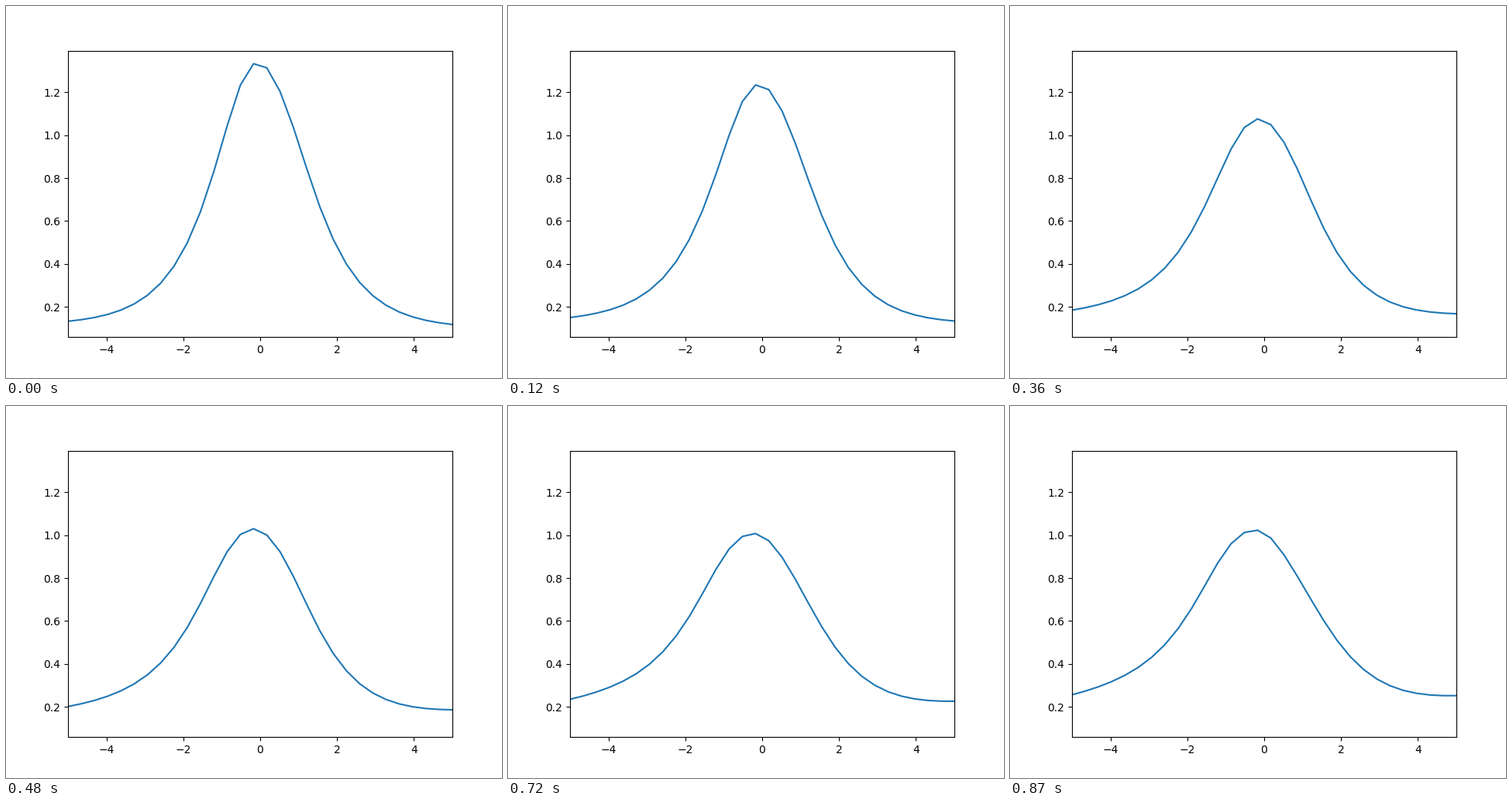
A matplotlib script that plays this animation: 640x480 px, repeating every 900 ms.

```python
import numpy as np
import matplotlib.pyplot as plt
from matplotlib.animation import FuncAnimation

FRAMES, INTERVAL = 30, 30

x = np.linspace(-5, 5, 30)
sech, tanh = 1 / np.cosh(x), np.tanh(x)

# Tall narrow pulse at the start of the loop.
start = (0.107 - 0.0085 * tanh
         + sech * (1.230 - 0.053 * tanh + 0.145 * tanh**2 + 0.123 * tanh**3))

# Lower pulse at the end, with a raised floor and a broad left shoulder.
end = (0.231 - 0.036 * np.sin(np.pi * x / 5)
       + sech * (0.780 - 0.083 * tanh + 0.177 * tanh**2
                 + (0.155 * x - 0.065) * tanh**3))

# Extra dip of the crest halfway through.
dip = sech * (0.137 + tanh**2 * (0.047 * x + 0.018 * x * tanh - 0.036))


def curve(i):
    u = i / (FRAMES - 1)
    return (1 - u) * start + u * end - np.sin(np.pi * u) * dip


fig, ax = plt.subplots(figsize=(6.4, 4.8), dpi=100)
line, = ax.plot(x, curve(0), color="#1f77b4", lw=1.5)
ax.set_xlim(-5, 5)
ax.set_ylim(0.0593, 1.3936)


def draw(i):
    line.set_ydata(curve(i))
    return line,


anim = FuncAnimation(fig, draw, frames=FRAMES, interval=INTERVAL,
                     repeat=True, repeat_delay=0)
plt.show()
```
